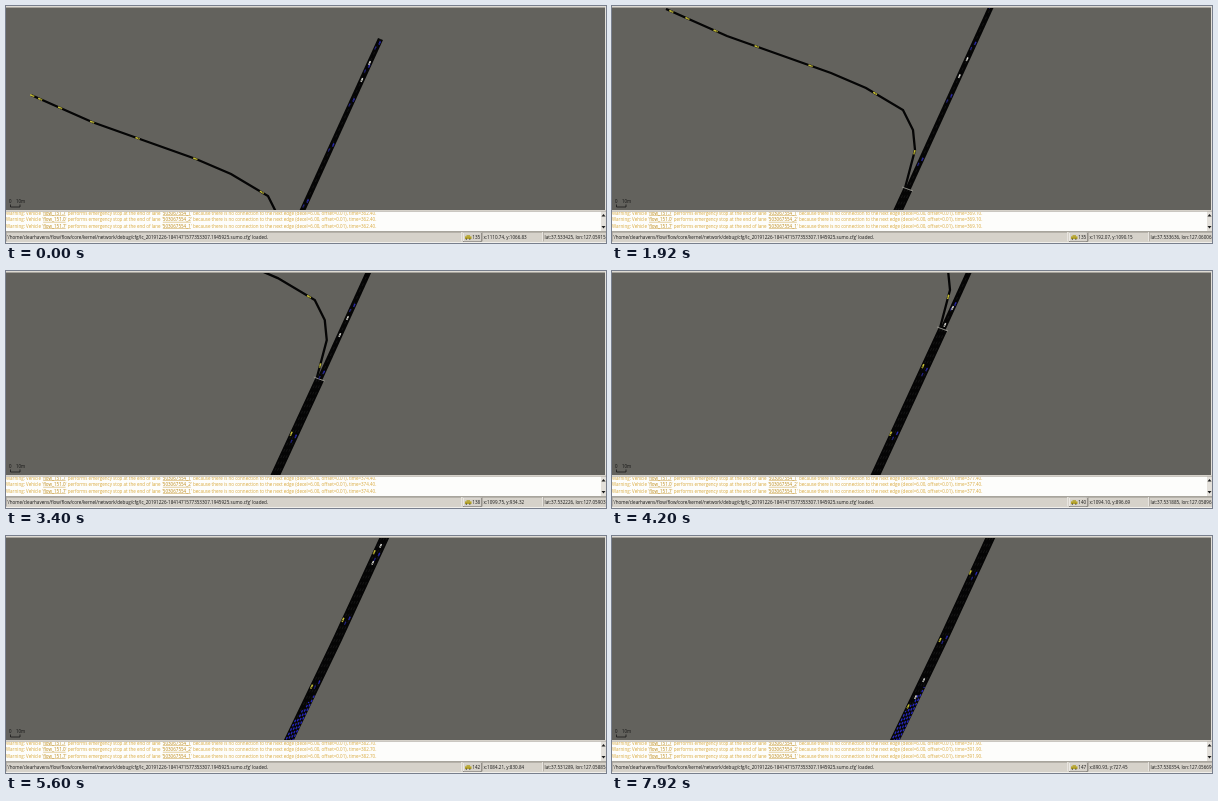
These frames come from a looping animation (600 px wide and 237 px high, 8000 ms). An HTML page with a canvas:

```html
<!DOCTYPE html>
<html lang="en">
<head>
<meta charset="utf-8">
<title>Traffic simulation</title>
<style>
html, body { margin: 0; width: 100%; height: 100%; overflow: hidden; background: #63625d; }
canvas { display: block; }
</style>
</head>
<body>
<canvas id="stage" width="600" height="237"></canvas>
<script>
const c = document.getElementById('stage').getContext('2d');
const LOOP = 8000;
const clamp = v => Math.min(1, Math.max(0, v));

// World coordinates: the view before the first pan.
const UPPER = [[374.5, 33], [267, 269]];
const LOWER = [[267, 269], [200, 414], [49, 728]];
const RAMP = [[25, 89], [86, 116], [190, 153], [225, 168], [262, 190], [272, 210], [274, 230], [264, 268]];
const MERGED = [...RAMP, ...LOWER.slice(1)];

// Camera drags: start, end (s), dx, dy
const PANS = [[1, 1.8, 29, -86], [2.6, 2.8, 3, -32], [2.8, 4.1, 32, -93], [4.5, 5.2, 68, -101]];
// Pointer stops: time (s), x, y in metres
const POINTER = [[.9, 1110.74, 1066.83], [1.933, 1192.1, 1090.2], [2.8, 1103.99, 962.54],
  [5.6, 1084.21, 830.84], [7.933, 890.93, 727.45]];

// Model time since the start, slowly speeding up
const elapsed = t => 3.4 * t + .04 * t * t;

// Distance travelled u periods after entry: speeding up, then constant speed
function travel(u, v, a, limit) {
  const w = Math.min(u, limit);
  return v * w + a * w * w + (v + 2 * a * limit) * .88 * (u - w);
}

// Point and heading at distance s along a polyline
function along(pts, s) {
  for (let i = 1; i < pts.length; i++) {
    const [x, y] = pts[i - 1], dx = pts[i][0] - x, dy = pts[i][1] - y, d = Math.hypot(dx, dy);
    if (s <= d || i === pts.length - 1) return [x + dx * s / d, y + dy * s / d, Math.atan2(dy, dx)];
    s -= d;
  }
}

// Row of [key, ...values] interpolated at k
function between(rows, k) {
  const i = Math.max(1, rows.findIndex(r => r[0] >= k));
  const a = rows[i - 1], b = k > rows.at(-1)[0] ? rows.at(-1) : rows[i];
  const f = clamp((k - a[0]) / (b[0] - a[0]));
  return a.map((v, j) => v + (b[j] - v) * f);
}

const CENTRE = [UPPER[0], ...LOWER].map(([x, y]) => [y, x]);
const mainX = y => between(CENTRE, y)[1];

function line(pts, color, width, dash = [], shift = 0, dashShift = 0) {
  c.strokeStyle = color;
  c.lineWidth = width;
  c.setLineDash(dash);
  c.lineDashOffset = dashShift;
  c.beginPath();
  pts.forEach(([x, y]) => c.lineTo(x + shift, y));
  c.stroke();
  c.setLineDash([]);
}

function rect(color, x, y, w, h) {
  c.fillStyle = color;
  c.fillRect(x, y, w, h);
}

function car(x, y, angle, color, length = 4, width = 1.5) {
  c.save();
  c.translate(x, y);
  c.rotate(angle);
  rect(color, -length / 2, -width / 2, length, width);
  rect('#1a1a08', length * .1, -width / 4, length * .2, width / 2);
  c.restore();
}

// Draws text at a large size scaled down, so glyph spacing stays fractional
function text(str, x, y, color = '#161616', size = 4.57) {
  c.save();
  c.translate(x, y);
  c.scale(.1, .1);
  c.font = `${size * 10}px "Open Sans", "Noto Sans", sans-serif`;
  c.fillStyle = color;
  c.fillText(str, 0, 0);
  const w = c.measureText(str).width / 10;
  c.restore();
  return x + w;
}

function roads() {
  line(RAMP, '#050505', 2.3);
  line(UPPER, '#050505', 5.4);
  line(LOWER, '#050505', 9);
  line(UPPER, '#2b2b2b', .4, [3, 4]);
  for (const shift of [-2.6, 0, 2.6]) line(LOWER, '#2b2b2b', .4, [3, 4], shift);
  line([[261, 267], [272, 271]], '#98978f', .9);
}

function traffic(t) {
  const phase = elapsed(t) / 4, frac = phase % 1;

  // Standing queue, one dashed line per lane
  const top = 470 - 3 * Math.max(0, t - 5.6);
  for (let lane = 0; lane < 4; lane++) {
    const y = top + 8 * (3 - lane);
    line([[mainX(y), y], LOWER[2]], '#2626bd', 1.3, [2.6, 2.2], 2.3 * lane - 3, lane * 1.7 - phase * 7);
  }

  for (let n = 0; n < 10; n++) {
    const y = 37 + travel(frac + n, 17.5, 5.5, 5);
    if (y > top) break;
    const shift = y > 275 ? 2.4 : 1;
    car(mainX(y) + shift, y, 2, '#2929b4', 3.6, 1.4);
    car(mainX(y + 5) + shift - 2, y + 5, 2, '#22228f', 3.4, 1.2);
  }

  for (let n = -1; n < 12; n++) {
    const [x, y, angle] = along(MERGED, 10 + travel(frac + n, 15.2, 6.6, 5.2));
    car(x - 3 * clamp((y - 300) / 60), y, angle, '#c4bc36', 4.4, 1.6);
  }

  for (const gap of [0, 17]) {
    const y = 57 + gap + 40 * t + 1.3 * t * t;
    car(mainX(y), y, 2, '#d8d8d4', 4, 1.5);
  }
}

function scaleBar() {
  text('0', 3, 197, '#111', 4.4);
  text('10m', 10, 197, '#111', 4.4);
  line([[4.5, 198.5], [4.5, 201], [14, 201], [14, 198.5]], '#111', .7);
}

function log(sim) {
  const amber = '#d8a83c', link = '#bd8a18';
  rect('#d6d2ca', 0, 204, 600, 33);
  rect('#a5a199', 0, 205, 600, .7);
  rect('#fdfdfb', 0, 205.7, 595, 19.3);
  c.save();
  c.beginPath();
  c.rect(0, 206, 595, 19);
  c.clip();
  const part = (str, x, y, color = amber) => text(str, x, y, color, 4.53);
  const linked = (str, x, y) => {
    const end = part(str, x, y, link);
    rect(link, x, y + .5, end - x, .4);
    return end;
  };
  for (let row = 0; row < 3; row++) {
    const y = 209 + 6.4 * row, odd = row % 2;
    let x = part("Warning: Vehicle '", 0, y);
    x = linked(odd ? 'flow_151.0' : 'flow_151.7', x, y);
    x = part("' performs emergency stop at the end of lane '", x, y);
    x = linked('503067554_' + (1 + odd), x, y);
    part("' because there is no connection to the next edge (decel=6.00, offset=0.01), time="
      + sim.toFixed(1) + '0.', x, y);
  }
  c.restore();

  rect('#e3e0da', 595, 205.7, 5, 19.3);
  c.fillStyle = '#1c1c1c';
  for (const [y, d] of [[210.5, -2.5], [220, 2.5]]) {
    c.beginPath();
    c.moveTo(595.5, y);
    c.lineTo(599.5, y);
    c.lineTo(597.5, y + d);
    c.fill();
  }
}

function statusBar(t) {
  rect('#96928a', 0, 225, 600, .7);
  rect('#f1efeb', 0, 236, 600, 1);
  for (const [x, w] of [[0, 455], [476, 60], [537, 63]]) {
    rect('#a09c94', x, 226.3, w, .6);
    rect('#a09c94', x, 226.3, .6, 9);
    rect('#f4f2ee', x + w, 226.3, .6, 9);
  }
  text("'/home/clearhavens/flow/flow/core/kernel/network/debug/cfg/"
    + "lc_20191226-1841471577353307.1945925.sumo.cfg' loaded.", 1, 232.8);

  // Raised vehicle-count button
  rect('#55524d', 457, 226.5, 18.5, 9.5);
  rect('#f4f2ee', 457, 226.5, 17.8, 8.8);
  rect('#d6d2ca', 457.7, 227.2, 17.1, 8.1);
  rect('#b5a32a', 459, 230.4, 6.5, 2.6);
  rect('#b5a32a', 460.5, 229.2, 3.5, 1.5);
  rect('#333', 459.8, 232.6, 1.2, 1);
  rect('#333', 463.2, 232.6, 1.2, 1);
  text(String(Math.round(135 + 2 * Math.max(0, t - 1.9))), 466.3, 232.8);

  const [, x, y] = between(POINTER, t);
  const lat = 37.533425 + (y - 1066.83) * 9.05e-6;
  const lon = 127.05915 + (x - 1110.74) * 1.12e-5;
  text(`x:${x.toFixed(2)}, y:${y.toFixed(2)}`, 477.5, 232.8);
  text(`lat:${lat.toFixed(6)}, lon:${lon.toFixed(5)}`, 538.5, 232.8);
}

function draw() {
  // 15 pictures per second, aligned to 40 ms ticks
  const tick = Math.floor(performance.now() % LOOP / 40);
  const t = Math.floor((tick + .5) * .6) / 15;

  rect('#63625d', 0, 0, 600, 237);
  c.save();
  c.beginPath();
  c.rect(0, 2, 599, 202);
  c.clip();
  for (const [start, end, dx, dy] of PANS) {
    const f = clamp((t - start) / (end - start));
    c.translate(dx * f, dy * f);
  }
  roads();
  traffic(t);
  c.restore();

  rect('#dedbd4', 0, 0, 600, 1);
  rect('#a5a29b', 0, 1, 600, 1);
  rect('#e2dfd9', 599, 0, 1, 204);
  scaleBar();
  log(362.4 + elapsed(t));
  statusBar(t);
  requestAnimationFrame(draw);
}
draw();
</script>
</body>
</html>
```
